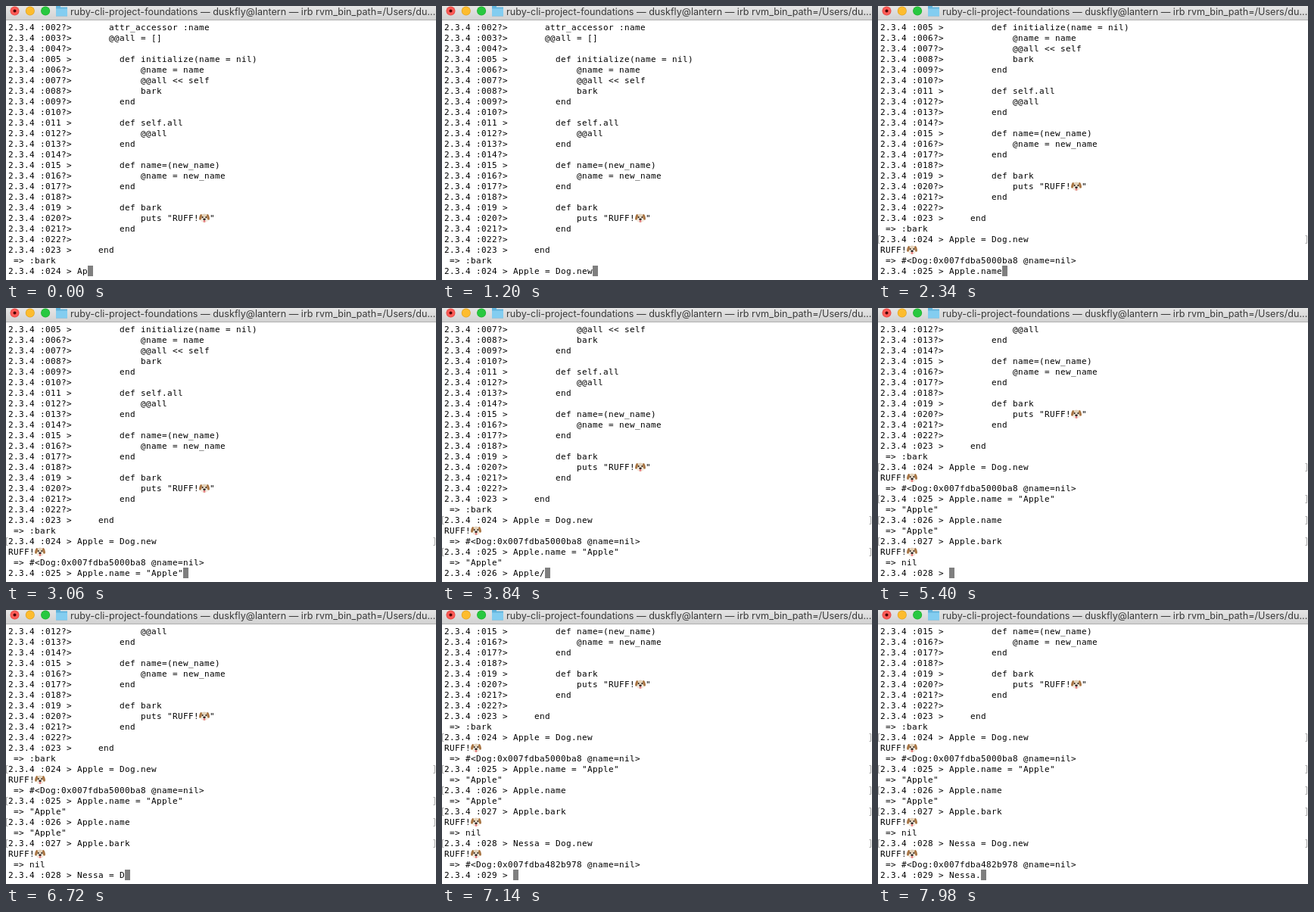
An HTML page with a canvas for the animation above (8 s loop, 568 by 362 pixels).

```html
<!DOCTYPE html>
<html lang="en">
<head>
<meta charset="utf-8">
<title>irb session</title>
<style>
html, body { margin: 0; width: 100%; height: 100%; overflow: hidden; background: #fff; }
canvas { display: block; }
</style>
</head>
<body>
<canvas id="stage" width="568" height="362"></canvas>
<script>
const ctx = document.getElementById('stage').getContext('2d');
const W = 568, H = 362, LOOP = 8000;
const CELL = 7, LINE = 14, LEFT = 3, TOP = 21, ROWS = 24;
const DOG = '🐶';

// Class body already entered: [indent, code] for prompts 002 to 023
const body = [
  [6, 'attr_accessor :name'], [6, '@@all = []'], [0, ''],
  [8, 'def initialize(name = nil)'], [12, '@name = name'], [12, '@@all << self'],
  [12, 'bark'], [8, 'end'], [0, ''],
  [8, 'def self.all'], [12, '@@all'], [8, 'end'], [0, ''],
  [8, 'def name=(new_name)'], [12, '@name = new_name'], [8, 'end'], [0, ''],
  [8, 'def bark'], [12, `puts "RUFF!${DOG}"`], [8, 'end'], [0, ''],
  [4, 'end']
];

// Typed commands: keys are [time, text], '<' deletes one character
const commands = [
  { keys: [[0, 'Ap'], [60, 'p'], [120, 'l'], [240, 'e'], [360, ' ='], [420, ' '], [540, 'D'], [600, 'og'],
           [900, '.'], [1020, 'n'], [1140, 'e'], [1200, 'w']],
    enter: 1380, out: [`RUFF!${DOG}`, ' => #<Dog:0x007fdba5000ba8 @name=nil>'] },
  { keys: [[1680, 'A'], [1740, 'p'], [1800, 'p'], [1860, 'l'], [1920, 'e'], [2040, '.'], [2160, 'n'],
           [2220, 'a'], [2280, 'm'], [2340, 'e'], [2520, ' '], [2580, '='], [2640, ' '], [2700, '"'],
           [2760, 'A'], [2820, 'p'], [2880, 'p'], [2940, 'l'], [3000, 'e'], [3060, '"']],
    enter: 3240, out: [' => "Apple"'] },
  { keys: [[3480, 'A'], [3540, 'p'], [3600, 'pl'], [3660, 'e'], [3840, '/'], [4020, '<'],
           [4200, '.n'], [4260, 'am'], [4320, 'e']],
    enter: 4440, out: [' => "Apple"'] },
  { keys: [...'Apple.bark'].map((c, i) => [4740 + 60 * i, c]),
    enter: 5400, out: [`RUFF!${DOG}`, ' => nil'] },
  { keys: [[6120, 'N'], [6180, 'e'], [6240, 'ss'], [6300, 'a'], [6480, ' '], [6540, '='], [6600, ' '],
           [6720, 'D'], ...[...'og.new'].map((c, i) => [6780 + 60 * i, c])],
    enter: 7140, out: [`RUFF!${DOG}`, ' => #<Dog:0x007fdba482b978 @name=nil>'] },
  { keys: [[7380, 'N'], [7440, 'e'], [7560, 's'], [7620, 's'], [7740, 'a'], [7980, '.']],
    enter: Infinity, out: [] }
];

function prompt(n) {
  const fresh = n >= 23 || [5, 11, 15, 19].includes(n);
  return `2.3.4 :${String(n).padStart(3, '0')}${fresh ? ' ' : '?'}> `;
}

function typed(keys, t) {
  let s = '';
  for (const [at, text] of keys) {
    if (at > t) break;
    s = text === '<' ? s.slice(0, -1) : s + text;
  }
  return s;
}

function transcript(t) {
  const lines = body.map(([indent, code], i) => ({ text: prompt(i + 2) + ' '.repeat(indent) + code }));
  lines.push({ text: ' => :bark' });
  for (let i = 0; i < commands.length; i++) {
    const { keys, enter, out } = commands[i];
    const done = t >= enter;
    lines.push({ text: prompt(24 + i) + typed(keys, t), marked: done, cursor: !done });
    if (!done) break;
    lines.push(...out.map(text => ({ text })));
  }
  return lines.slice(-ROWS);
}

function ellipse(x, y, rx, ry, color, turn = 0) {
  ctx.fillStyle = color;
  ctx.beginPath();
  ctx.ellipse(x, y, rx, ry, turn, 0, 7);
  ctx.fill();
}

function drawDog(x, y) {
  const cx = x + 7, cy = y + 7.2;
  ellipse(cx, cy, 5.3, 5.7, '#e3d3bb');
  ellipse(cx, cy + 2.3, 3.9, 3.3, '#f7efe3');
  for (const side of [-1, 1]) {
    ellipse(cx + side * 5, cy - 1.4, 1.6, 4, '#a87442', side * -0.25);
    ellipse(cx + side * 2.3, cy - 1, 0.9, 1.1, '#30231c');
  }
  ellipse(cx, cy + 4, 1.4, 1.7, '#e57f83');
  ellipse(cx, cy + 1.5, 1.8, 1.2, '#2c2320');
}

function drawText(text, y) {
  let col = 0;
  for (const ch of text) {
    const x = LEFT + col * CELL;
    if (ch === DOG) {
      drawDog(x, y);
      col += 2;
      continue;
    }
    ctx.fillStyle = '#000';
    if (ch !== ' ') ctx.fillText(ch, x, y + 11);
    col++;
  }
  return LEFT + col * CELL;
}

function drawBracket(x, y, dir) {
  ctx.strokeStyle = '#a8a8a8';
  ctx.lineWidth = 1;
  ctx.beginPath();
  ctx.moveTo(x + 2 * dir, y + 2.5);
  ctx.lineTo(x, y + 2.5);
  ctx.lineTo(x, y + 12.5);
  ctx.lineTo(x + 2 * dir, y + 12.5);
  ctx.stroke();
}

function drawTitleBar() {
  const shade = ctx.createLinearGradient(0, 0, 0, 18);
  shade.addColorStop(0, '#e5e5e5');
  shade.addColorStop(1, '#d2d2d2');
  ctx.fillStyle = shade;
  ctx.fillRect(0, 0, W, 18);
  ctx.fillStyle = '#b0b0b0';
  ctx.fillRect(0, 18, W, 1);

  [['#e0443e', '#fc5b57'], ['#dea123', '#fdbc2e'], ['#1dad2b', '#28c840']].forEach(([rim, fill], i) => {
    const x = 11.5 + 20.3 * i;
    ellipse(x, 6.5, 6, 6, rim);
    ellipse(x, 6.5, 5.3, 5.3, fill);
  });
  ellipse(11.5, 6.5, 2, 2, '#4d0000');

  ctx.fillStyle = '#62b4dc';
  ctx.fillRect(66, 0, 6, 3);
  ctx.fillRect(66, 1.5, 15, 12);
  ctx.fillStyle = '#83cdf0';
  ctx.fillRect(66, 3.5, 15, 9.5);

  ctx.font = '12.6px Inter, Roboto, sans-serif';
  ctx.fillStyle = '#3a3a3a';
  ctx.fillText('ruby-cli-project-foundations — duskfly@lantern — irb rvm_bin_path=/Users/du...', 85, 11.5);
}

function draw(t) {
  ctx.fillStyle = '#fff';
  ctx.fillRect(0, 0, W, H);
  drawTitleBar();
  ctx.font = '11px "DejaVu Sans Mono", monospace';
  transcript(t).forEach(({ text, marked, cursor }, row) => {
    const y = TOP + row * LINE;
    const end = drawText(text, y);
    if (marked) {
      drawBracket(0.5, y, 1);
      drawBracket(566.5, y, -1);
    }
    if (cursor) {
      ctx.fillStyle = '#7f7f7f';
      ctx.fillRect(end, y, CELL, LINE);
    }
  });
}

const start = performance.now();
function tick() {
  draw((performance.now() - start) % LOOP);
  requestAnimationFrame(tick);
}
tick();
</script>
</body>
</html>
```
